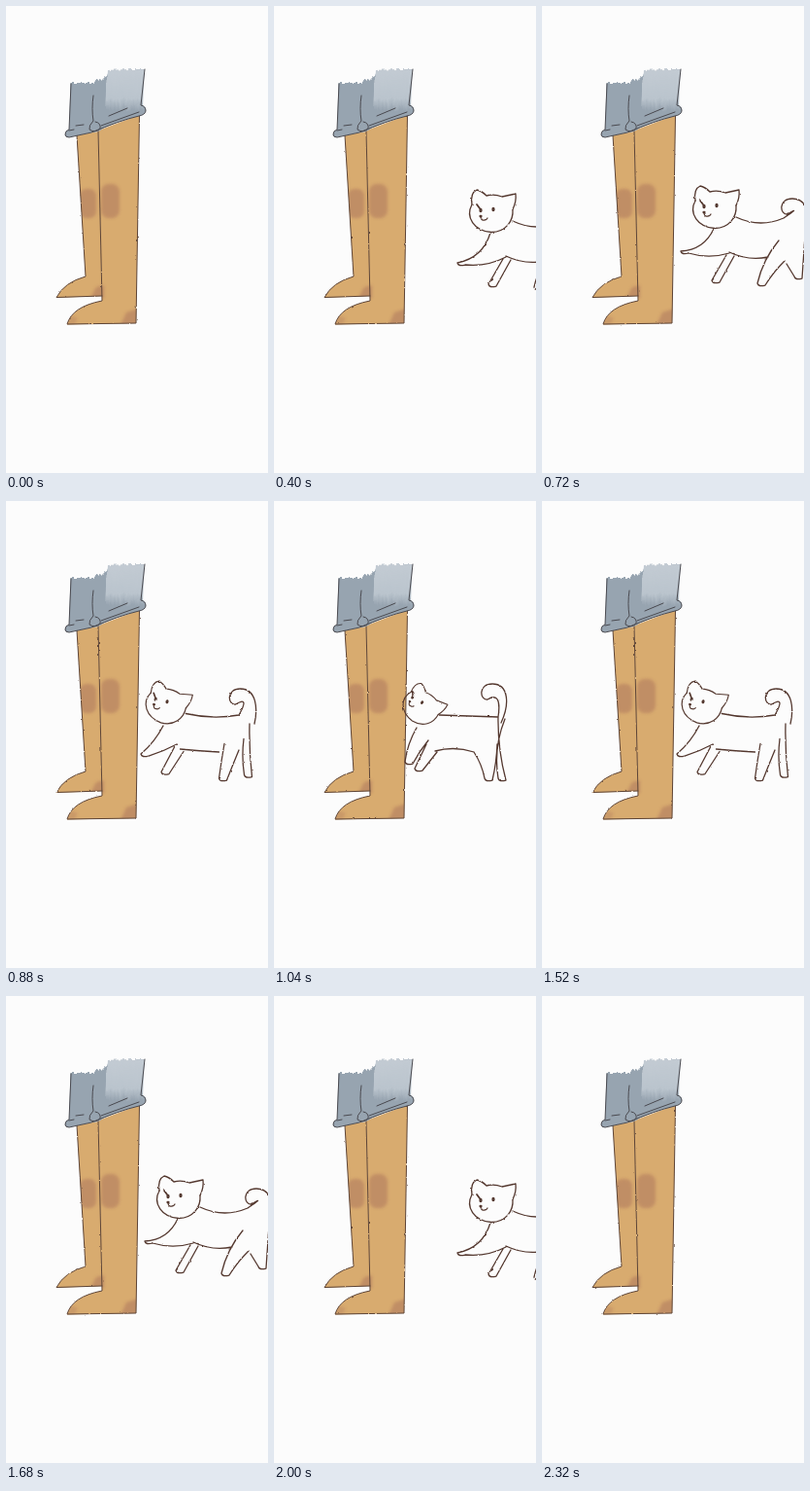
An HTML page for the animation above (2.4 s loop, 270 px wide and 480 px high).

```html
<!DOCTYPE html>
<html lang="en">
<head>
<meta charset="utf-8">
<title>Cat and legs</title>
<style>
  html, body { margin: 0; width: 100%; height: 100%; overflow: hidden; background: #fcfcfc; }
  svg { display: block; width: 100%; height: 100%; }
  .ink { fill: none; stroke: #5d4436; stroke-width: 1; stroke-linecap: round; stroke-linejoin: round; }
  .denim { stroke: #4a4a50; }
  .skin { fill: #d8ab6f; }
  #cat { fill: none; stroke: #54382f; stroke-width: 1.3; stroke-linecap: round; stroke-linejoin: round; }
  #face { fill: #46302a; }
</style>
</head>
<body>
<svg viewBox="0 0 270 480">
  <defs>
    <filter id="blur" x="-30%" y="-30%" width="160%" height="160%"><feGaussianBlur stdDeviation="1.8"/></filter>
    <filter id="frayed" filterUnits="userSpaceOnUse" x="50" y="50" width="110" height="100" color-interpolation-filters="sRGB">
      <feTurbulence type="fractalNoise" baseFrequency=".3 .06" numOctaves="2" seed="4"/>
      <feDisplacementMap in="SourceGraphic" scale="7" xChannelSelector="A" yChannelSelector="G"/>
    </filter>
    <filter id="pencil" filterUnits="userSpaceOnUse" x="0" y="0" width="400" height="480" color-interpolation-filters="sRGB">
      <feTurbulence id="grain" type="fractalNoise" baseFrequency=".25" numOctaves="2"/>
      <feDisplacementMap in="SourceGraphic" scale="2" xChannelSelector="R" yChannelSelector="G"/>
    </filter>
    <linearGradient id="fade" x2="0" y2="1">
      <stop stop-color="#c3cbd3"/><stop offset=".7" stop-color="#bac4cd"/><stop offset="1" stop-color="#97a4b0"/>
    </linearGradient>
    <clipPath id="jeans">
      <path d="M67 60H143L141 102Q145 104 144 108Q143 112 137 113Q116 118 100 126Q95 130 88 130L64 135Q60 134 61 131Q62 128 65 127Z"/>
    </clipPath>
    <clipPath id="skin">
      <path id="farLeg" d="M73 133L95 129L99 298L52 300Q60 284 82 278Z"/>
      <path id="nearLeg" d="M95 128L137.5 112L134 326L63 327.500Q68 309 99 303Z"/>
    </clipPath>
  </defs>

  <use href="#farLeg" class="skin"/>
  <use href="#nearLeg" class="skin"/>
  <g clip-path="url(#skin)" fill="#b98562" opacity=".75">
    <g filter="url(#blur)">
      <rect x="76" y="188" width="17" height="30" rx="7"/>
      <rect x="98" y="183" width="19" height="35" rx="8"/>
    </g>
    <path d="M136 311L124 315L118 328H136ZM101 287L93 289L87 300H101Z" filter="url(#blur)"/>
    <path d="M62 328L66 318L74 321L70 328Z" filter="url(#blur)" opacity=".6"/>
  </g>
  <g class="ink" filter="url(#pencil)">
    <path d="M73 133L82 278Q60 284 52 299.500L99 298"/>
    <path d="M95 128L99 303Q68 309 63 327L134 326L137.5 112"/>
  </g>

  <g clip-path="url(#jeans)">
    <g filter="url(#frayed)">
      <path d="M60 79L90 79L103 72L105 66L150 65V140H55Z" fill="#97a4b0"/>
      <path d="M104 66L150 65V108H102Z" fill="url(#fade)"/>
    </g>
  </g>
  <g class="ink denim">
    <path d="M67 80L65 127Q61 128 61 132Q61 135 65 135L88 130Q116 118 137 113Q143 112 144 108Q144 103 139 102L143 65"/>
    <path d="M90 92Q88 106 90 118Q85 123 86 127Q92 131 97 126Q98 120 92 119"/>
    <path d="M65 128L70 127M72 123L80 122M106 113L125 105M98 123L137 109"/>
  </g>

  <g filter="url(#pencil)">
    <g id="cat">
      <path id="body"/>
      <g id="head">
        <path d="M-20 -9Q-22 -21 -15 -24Q-10 -23 -5 -18Q3 -20 11 -17L25 -20Q26 -12 22 -4"/>
        <path d="M-20 -9C-27 4 -18 18 0 19.500C15 19 23 8 22 -4"/>
        <g id="face">
          <path d="M-15 -9L-12 -5" stroke-width="1.8"/>
          <ellipse cx="-11" cy="-3" rx="1" ry="1.600"/>
          <ellipse cx="2" cy="-4" rx="1" ry="1.600"/>
          <ellipse cx="-11" cy="3" rx="1" ry=".6"/>
          <path d="M-11 4Q-10 8 -7 7Q-5 7 -4 5" fill="none"/>
        </g>
      </g>
    </g>
  </g>
</svg>
<script>
const STEP = 80, LOOP = 2400;
const ENTER = 2, ARRIVE = 9, TOUCH = 13;
const get = id => document.getElementById(id);

// Limb: front joint x y, toe x y, back joint x y, bend
const walk = {
  head: [178, 209, 0, 1],
  root: [249, 218], hip: [278, 230], hook: [246, 205], backSag: 11,
  belly: [193, 253, 233, 258], bellySag: 7,
  limbs: [
    [177, 229, 143, 252, 193, 254, -.3],
    [190, 256, 175, 282, 198, 257, 0],
    [244, 241, 222, 285, 250, 262, .12],
    [252, 265, 260, 278, 271, 236, 0]
  ]
};
const rub = {
  head: [151.5, 212, 33, .86],
  root: [231, 222], hip: [234, 228], hook: [213, 195], backSag: 0,
  belly: [166, 257, 206, 258], bellySag: -6,
  limbs: [
    [147, 233, 135, 268, 159, 246, .1],
    [157, 250, 145, 275, 168, 258, 0],
    [206, 258, 217, 285, 230, 250, -.1],
    [238, 224, 231, 285, 231, 222, .14]
  ]
};

// Blends numbers, arrays and poses alike
function mix(a, b, t) {
  if (typeof a === 'number') return a + (b - a) * t;
  if (Array.isArray(a)) return a.map((v, i) => mix(v, b[i], t));
  return Object.fromEntries(Object.keys(a).map(n => [n, mix(a[n], b[n], t)]));
}

// Each pair of legs trades places every half cycle
function stride(left) {
  const phase = left * Math.PI / 4, swap = (1 - Math.cos(phase)) / 2;
  return walk.limbs.map((limb, i) => {
    const leg = mix(limb, walk.limbs[i ^ 1], swap);
    const forward = i % 2 ? swap : 1 - swap;
    const lift = Math.max(0, Math.sin(phase) * (i % 2 ? -1 : 1));
    leg[3] += (i < 2 ? 2 * left * forward : 0) - 5 * lift;
    return leg;
  });
}

function bow(x1, y1, x2, y2, bend) {
  const cx = (x1 + x2) / 2 - (y2 - y1) * bend, cy = (y1 + y2) / 2 + (x2 - x1) * bend;
  return `Q${cx} ${cy} ${x2} ${y2}`;
}

function sag(x1, y1, x2, y2, depth) {
  return `M${x1} ${y1}Q${(x1 + x2) / 2} ${(y1 + y2) / 2 + depth} ${x2} ${y2}`;
}

function limbPath([ax, ay, fx, fy, bx, by, bend]) {
  const hx = fx + 8, hy = fy + 2;
  return `M${ax} ${ay}${bow(ax, ay, fx, fy, bend)}` +
    `Q${fx + 1} ${fy + 4} ${hx} ${hy}${bow(hx, hy, bx, by, -bend / 2)}`;
}

function tailPath([rx, ry], [x, y], [ex, ey]) {
  return `M${rx} ${ry}Q${x + 22} ${y} ${x + 7} ${y + 9}` +
    `C${x - 1} ${y + 10} ${x - 3} ${y - 7} ${x + 12} ${y - 7}` +
    `C${x + 29} ${y - 7} ${x + 30} ${y + 14} ${ex} ${ey}`;
}

function draw(k) {
  get('cat').style.display = k < ENTER ? 'none' : '';
  if (k < ENTER) return;
  const left = Math.max(0, ARRIVE - k);
  const t = Math.min(1, Math.max(0, (k - ARRIVE) / (TOUCH - ARRIVE)));
  const nudge = Math.max(0, k - TOUCH);
  const p = mix({ ...walk, limbs: stride(left) }, rub, t * t * (3 - 2 * t));
  const [x, y, angle, size] = p.head;

  get('grain').setAttribute('seed', k);
  get('cat').setAttribute('transform', `translate(${9.3 * left + .55 * left * left} ${left})`);
  get('head').setAttribute('transform',
    `translate(${x - nudge / 2} ${y - 2 * nudge}) rotate(${angle}) scale(${size})`);
  get('face').setAttribute('transform', `translate(${-4 * t} ${-1.5 * t})`);
  get('body').setAttribute('d',
    sag(x + 22 * size, y + 8, ...p.root, p.backSag) +
    sag(...p.belly, p.bellySag) +
    tailPath(p.root, p.hook, p.hip) +
    p.limbs.map(limbPath).join(''));
}

// The cat walks in, rubs, and retraces its steps
let last = -1;
function tick() {
  const f = Math.floor(performance.now() % LOOP / STEP);
  if (f !== last) draw(Math.min(f, LOOP / STEP - f));
  last = f;
  requestAnimationFrame(tick);
}
tick();
</script>
</body>
</html>
```
